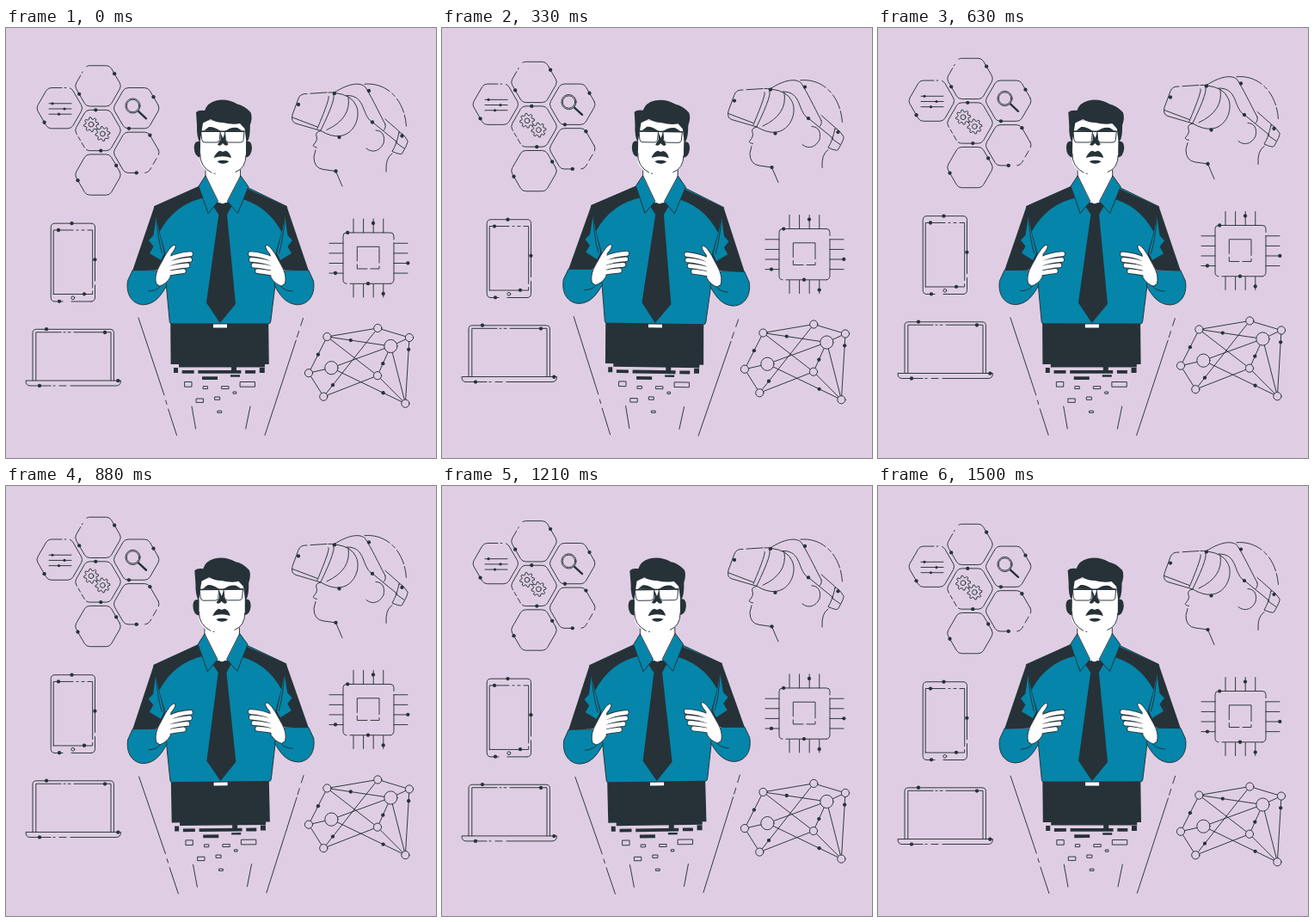
An HTML page for the animation above (1.54 s loop, 500 by 500 pixels).

```html
<!DOCTYPE html>
<html lang="en">
<head>
<meta charset="utf-8">
<title>Future of technology</title>
<style>
html, body { margin: 0; width: 100%; height: 100%; overflow: hidden; background: #dfcee3; }
svg { display: block; width: 100vw; height: 100vh; }
path, rect, circle { stroke: #263238; stroke-width: .95; stroke-linecap: round; stroke-linejoin: round; }
.line { fill: none; }
.dark { fill: #263238; stroke: none; }
.blue { fill: #0585aa; }
.plain { fill: #0585aa; stroke: none; }
.white { fill: #fff; }
.skin { fill: #fff; stroke: none; }
.bg { fill: #dfcee3; }
path.finger { fill: none; stroke-width: 6.6; }
path.pale { stroke: #fff; stroke-width: 4.9; }
</style>
</head>
<body>
<svg viewBox="0 0 500 500">
  <g id="float"></g>
  <g id="man"></g>
</svg>
<script>
const LOOP = 1540, LEAD = 50, RISE = 10.4;
const floatG = document.getElementById('float');
const manG = document.getElementById('man');

const path = (d, cls = 'line', extra = '') => `<path class="${cls}" d="${d}" ${extra}/>`;
const circle = (x, y, r, cls = 'line') => `<circle class="${cls}" cx="${x}" cy="${y}" r="${r}"/>`;
const rect = (x, y, w, h, cls = 'line') =>
  `<rect class="${cls}" x="${x}" y="${y}" width="${w}" height="${h}"/>`;
const dot = (x, y, r = 2.15) => circle(x, y, r, 'dark');
const mirror = art => `<g transform="translate(499 0) scale(-1 1)">${art}</g>`;
const range = (n, f) => Array.from({ length: n }, (_, i) => f(i));
const mix = (a, b, t) => [a[0] + (b[0] - a[0]) * t, a[1] + (b[1] - a[1]) * t];
const polar = (x, y, r, a) => [x + r * Math.cos(a), y + r * Math.sin(a)];

// Rounded hexagon; marks are places along its six sides, counted clockwise from the right corner.
function hex([x, y], dash, marks) {
  const p = range(6, i => polar(x, y, 27.3, i * Math.PI / 3));
  const side = t => mix(p[Math.floor(t)], p[Math.floor(t + 1) % 6], t % 1);
  const d = p.map((c, i) =>
    `${i ? 'L' : 'M'}${side((i + 5.85) % 6)}Q${c} ${side(i + .15)}`).join('') + 'Z';
  return path(d, 'line', `pathLength="100" stroke-dasharray="${dash}"`) +
    marks.map(t => dot(...side(t))).join('');
}

function gear(x, y) {
  const pts = range(32, i => polar(x, y, i % 4 < 2 ? 6.2 : 8.5, (i + .8) * Math.PI / 16));
  return path(`M${pts.join('L')}Z`) + circle(x, y, 2.9);
}

function hexes() {
  const around = k => polar(107, 119, 51.6, k * Math.PI / 6);
  return hex(around(-3), '61 2 1 5 31 0', [5.4, 2.6]) +
    hex(around(-5), '79 2 1 3 15 0', [2.3]) +
    hex(around(-1), '100 0', [5.45, 1.82]) +
    hex([107, 119], '36 2 4 2 3 2 51 0', [4.4, 1.38]) +
    hex(around(1), '4 3 5 3 6 5 74 0', [5.15, 1.5]) +
    hex(around(3), '100 0', [5.55, 2.72]) +
    range(3, i => path(`M50 ${87.8 + 6.2 * i}h26`) +
      dot([54, 68, 61.5][i], 87.8 + 6.2 * i, 1.6)).join('') +
    circle(147.5, 90.5, 8.6) + circle(147.5, 90.5, 7.2) +
    path('M154 97L163 105.3', 'line', 'style="stroke-width:2.4"') +
    gear(99, 112.2) + gear(112.4, 123);
}

function headset() {
  return path('M373 75L354 76.2M350 76.5Q342 76 340 82L333 101Q331 109 337 111L366 119.5C400 140 415 105 407 90Q402 78 383 75.5Q378 74.5 375 75') +
    path('M375 79Q378 79 362 117M380 76.5Q386 78 366 119M398 80Q402 105 373 118.5M333 104L362 115') +
    path('M382 75C397 65 412 62 418 69C425 80 432 95 441 112') +
    path('M396 78.5C420 78 412 103 428 111L455 133M441 112Q442 117 439 119M441 106L458 121') +
    path('M457 121.5Q460 120 467 131Q468 133 460.5 146Q459 148 449 143.5Q454 136 457 121.5ZM453 133L463 140') +
    path('M417 65.2C442 63 463 82 465.5 114', 'line', 'stroke-dasharray="31 3.5 5 3.5 18 3"') +
    path('M430 119C438 119 441 126 439 134C435 143 426 146 419 140M449 146Q441 151 442 167') +
    path('M366 119.5Q359 121 361 126Q363 130 357.5 136Q356.5 138 361.5 139M360 142L358 150Q358 163 369 164.5L383.5 166.5L391 184') +
    dot(340, 89) + dot(382, 76) + dot(422, 73) + dot(426, 109.5) +
    dot(460.5, 125.5) + dot(387.5, 127) + dot(383.5, 166.5);
}

function phone() {
  return path('M99 318Q103.5 318 103.5 313V299M103.5 294V232Q103.5 227.2 99 227.2H57Q52.2 227.2 52.2 232V313Q52.2 318 57 318H66M76 318H99') +
    path('M55.2 309.5V235H78M82 235H84M88 235H91M95 235H100.7V302M100.7 306V309.5H55.2') +
    circle(77.8, 313.8, 1.9) +
    dot(76.5, 227.2) + dot(61, 235) + dot(103.4, 269.3) + dot(91, 309.3) + dot(62, 317.8);
}

function laptop() {
  return path('M31 410V354.5Q31 350.3 35.5 350.3H121Q125.4 350.3 125.4 354.5V410') +
    path('M34.8 410V353.8H64M67 353.8H69M72 353.8H75M79 353.8H122V410') +
    path('M52 416H28Q23 416 23 410H133.5Q133.5 416 128 416H75M70 416H62M57 416H55') +
    dot(47, 350.2) + dot(115, 354) + dot(130.3, 410.2) + dot(39, 416);
}

function chip() {
  const pins = range(4, i => {
    const x = 404 + 11.6 * i, y = 250.3 + 11.6 * i;
    return `M${x} 222v16m0 60v15M376 ${y}h16m59 0h16`;
  });
  return path(pins.join('')) +
    path('M447 297.3Q451 297 451 292V250M451 246V242Q451 238 447 238H396Q392 238 392 242V293Q392 297 396 297.3M400 297.3H447') +
    path('M408.3 271V254.3H434V273M434 277V280H424M420 280H408.3V275') +
    dot(397.2, 238) + dot(427, 227) + dot(467.3, 273.4) + dot(383, 285) + dot(421, 297.2) + dot(438.7, 309);
}

function network() {
  const nodes = {
    A: [432.3, 349], B: [373.4, 359], C: [469, 360], D: [447.4, 370], E: [378.4, 395.2],
    F: [352, 401.2], G: [432, 404.2], H: [369.3, 428.7], I: [464.4, 436.7]
  };
  const edges = 'AB AC BD BF BG FE FH HA HG ED EI DG DI CD CI GI'.split(' ');
  const beads = { BD: .37, BF: .49, HA: .17, DG: .59, CI: .18, EI: .7 };
  return path(edges.map(([a, b]) => `M${nodes[a]}L${nodes[b]}`).join('')) +
    Object.entries(nodes).map(([k, p]) => circle(...p, 'DE'.includes(k) ? 7.6 : 4.6, 'bg')).join('') +
    Object.entries(beads).map(([[a, b], t]) => dot(...mix(nodes[a], nodes[b], t))).join('');
}

function hand() {
  const fingers = range(4, i =>
    `M${190 - i} ${269 + 5.5 * i}Q${200 - i} ${264 + 6.5 * i} ${214.5 - .9 * i * i} ${262.8 + 6.6 * i}`).join('');
  return path(fingers, 'finger') +
    path('M174.5 297C172 286 178 278 181 272Q186 262 190 257Q195 251 197 253Q198 256 192 263L191 290Q186 298 179 300Z', 'white') +
    path(fingers, 'finger pale') + path('M181 276L189 265V290L181 296Z', 'skin');
}

function arm() {
  return path('M224 184.5L172.5 207.5L146.8 283L176 281L186 264L178.5 237Q196 205 230 197.5Z', 'dark') +
    path('M174.8 219L171.5 241L166 247L171.5 254L167 262L180 270L184 262L178 237Z', 'plain') +
    path('M175 219Q176 243 181.5 262') +
    path('M147 282L141.5 294C139 310 147 321.5 160 321.8C174 321 181 310 187 299L182 289L175 282Z', 'blue') +
    path('M181 286Q185 305 166 306') + hand();
}

function head() {
  const lens = x => path(`M${x} 120.2h22.2l-1 10.3q-.7 2.5-3.2 2.5h-14q-3 0-3.3-3Z`, 'white');
  return path('M232 160V180L252 206L272 180V160Z', 'skin') +
    path('M232 166V174M272.5 165V174') +
    path('M226 132Q219 130 218.7 139Q219 150 226.5 150.5ZM279 132Q286 130 286 140Q285 150 278.5 150.5Z', 'dark') +
    path('M227 108L225.5 154Q225.5 162 238 168Q253 173 268 167Q279 162 279 150V108Z', 'skin') +
    path('M225.7 146Q225 161 239 168.3M242 169.2L243 169.4M279 148Q279 163 267 167.5') +
    path('M225.5 133L229 110.5L238 106Q244 110 252 110Q264 113 272 111L277.5 117L279.5 133Q284 130 283.8 113Q287 104 284.5 98Q277 90 269 88.5Q257 81.5 244 84.5Q234 87 231 96Q224 95 221 98L222 113Q221.5 127 225.5 133Z', 'dark') +
    path('M230 119.5L236 115Q242 114.5 249.5 120ZM254.5 120Q262 114.5 269 116L275 119.8Z', 'dark') +
    lens(227) + lens(254.8) +
    path('M227 120.3H277', 'line', 'style="stroke-width:1.5"') +
    path('M249.2 121L249.5 130L246 135.5Q249 138.5 252 134Q256 139 258.5 135L255 130L254.8 121L252.2 128Z', 'dark') +
    path('M241.5 151Q245 143.5 249 142.8L252 144L255.5 142.8Q260 144 262 151Q252 147.5 241.5 151ZM245.5 155Q252 152.6 259.5 155Q256 158.2 252 157.8Q248 158 245.5 155Z', 'dark');
}

// Trouser hem breaking up: solid strips first, then ever smaller hollow pieces.
function fragments() {
  let x = 195;
  const strips = [5, 14, 50, 12, 6].map((w, i) => {
    const s = rect(x, i % 4 ? 398 : 395, w, i % 4 ? 3.8 : 6, 'dark');
    x += w + 4.7;
    return s;
  });
  return strips.join('') +
    rect(201, 390, 100, 4.5, 'dark') + rect(262, 393, 6, 6, 'dark') +
    rect(228, 405.3, 18, 3.8, 'dark') + rect(261, 403.3, 11, 2.4, 'dark') +
    range(4, i => rect(208 + 21.5 * i, 411.5 + 6 * Math.sin(i * Math.PI / 3),
      5 + 3 * (i - 1) ** 2, i % 3 ? 2.9 : 5.7)).join('') +
    range(3, i => rect(221.5 + 21.5 * i, 431 - 2 * i * i, 8 - 2.4 * i, 4.4 - 1.1 * i)).join('') +
    rect(246.3, 445.2, 4.4, 2.2);
}

function man() {
  return path('M154 337L184 427M185.7 433L187 437.5M188.6 443L198.5 473.5M216 440L220.6 466') +
    path('M345.5 337.5L342.7 346M340.6 352.5L338.4 359.5M337.3 363L301 473.5M284 440L278.7 466') +
    path('M191.2 343H305.2L305.8 391H191.6Z', 'dark') + fragments() + head() +
    path('M225 184L172.5 207.5L178 240L186.3 299L190.3 342Q190.5 344 193 344H305Q307.5 344 307.8 341L313 299L321 240L326.5 207.5L278 184L252 206Z', 'blue') +
    arm() + mirror(arm()) +
    path('M240 190H264L258 203H246Z', 'skin') +
    path('M231.8 172L224 184L235 215.5L246.5 202Z', 'blue') +
    path('M273 172L282 184.5L269.5 215.5L257.5 202Z', 'blue') +
    path('M245.5 203Q252 205.5 258.5 202.5L262.5 207L257 217L267 321L248.8 343L233 319.5L247.3 217L241.5 208Z', 'dark') +
    rect(241, 344.6, 16, 3.8, 'skin');
}

floatG.innerHTML = hexes() + headset() + phone() + laptop() + chip() + network();
manG.innerHTML = man();

// Triangle waves: 0..1..0 for the drift, 0..1..-1..0 for the sway.
const lift = p => 1 - Math.abs(2 * p - 1);
const sway = p => p < .25 ? 4 * p : p < .75 ? 2 - 4 * p : 4 * p - 4;

function draw(ms) {
  const p = (ms + LEAD) / LOOP % 1, p0 = LEAD / LOOP;
  floatG.setAttribute('transform', `translate(0 ${(RISE * (lift(p0) - lift(p))).toFixed(3)})`);
  manG.setAttribute('transform', `rotate(${(sway(p) - sway(p0)).toFixed(4)} 250 279)`);
}

const start = performance.now();
function tick() {
  draw((performance.now() - start) % LOOP);
  requestAnimationFrame(tick);
}
draw(0);
requestAnimationFrame(tick);
</script>
</body>
</html>
```
